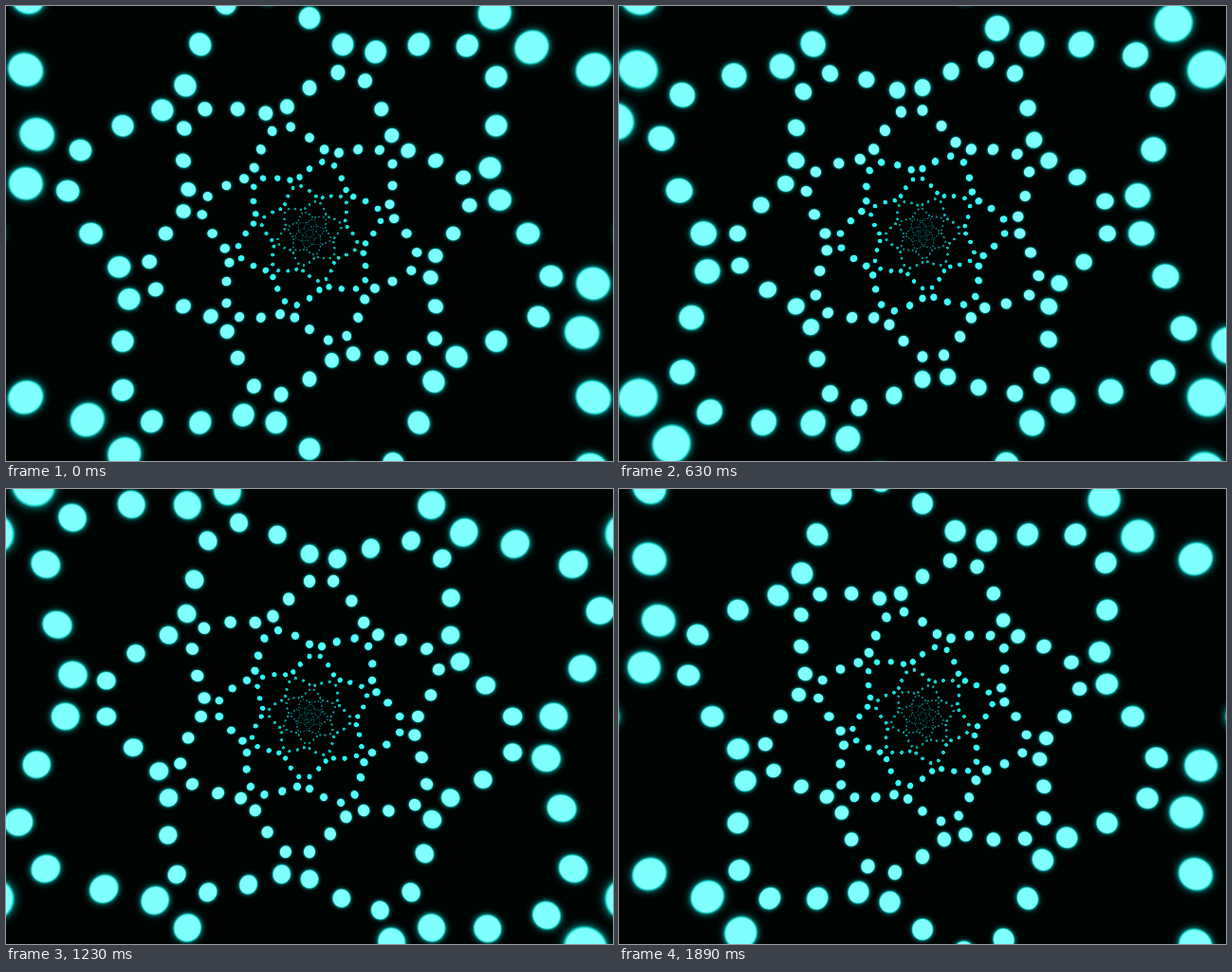
Animation, 640 px wide and 480 px high, one loop 1.92 s. Source, as an HTML page with a canvas:

```html
<!DOCTYPE html>
<html lang="en">
<head>
<meta charset="utf-8">
<title>Dot stars</title>
<style>
html, body { margin: 0; width: 100%; height: 100%; overflow: hidden; background: #000403; }
canvas { display: block; }
</style>
</head>
<body>
<canvas id="stage" width="640" height="480"></canvas>
<script>
const ctx = document.getElementById('stage').getContext('2d');
const FRAMES = 64, STEP = 30, SPOKES = 36, TAU = 2 * Math.PI;
const GROWTH = Math.log(1.5);  // log of the size ratio between neighbouring rings
const WAVE = 0.34;             // depth of the six-lobed wave, in rings
const ZOOM = 4 / FRAMES;       // rings travelled per frame
const GLOW = 1.6;              // reach of the halo, in dot radii

// Small dots are pure cyan, large ones have a pale core.
function dotPaint(radius) {
  const red = 127 * Math.min(1, Math.max(0, (radius - 30) / 80));
  const core = `rgb(${red}, 255, 250)`;
  const paint = ctx.createRadialGradient(0, 0, 0, 0, 0, GLOW);
  const stop = (at, color) => paint.addColorStop(at / GLOW, color);
  stop(0, core);
  stop(0.94, core);
  stop(1.02, 'rgba(20, 225, 216, .9)');
  stop(1.12, 'rgba(0, 140, 132, .5)');
  stop(1.3, 'rgba(0, 90, 85, .22)');
  stop(GLOW, 'rgba(0, 50, 48, 0)');
  return paint;
}

function dot(angle, r, size, speed) {
  const stretch = 0.12 * GROWTH * speed * r;  // blur along the direction of travel
  ctx.setTransform(1, 0, 0, 1, 320, 240);
  ctx.rotate(-angle);
  ctx.translate(r, 0);
  ctx.scale(size + stretch, size);
  ctx.fillRect(-GLOW, -GLOW, 2 * GLOW, 2 * GLOW);
}

function drawRing(ring, frame) {
  const level = 0.4 + ring + ZOOM * frame;
  const radius = Math.exp(GROWTH * level);
  if (radius < 3 || radius > 540) return;
  const size = Math.max(0.05 * radius - 0.5, 0.03 * radius + 0.3);
  const depth = ring % 2 ? -WAVE : WAVE;
  const turn = TAU * (frame + 0.5) / FRAMES;
  ctx.fillStyle = dotPaint(radius);
  ctx.globalAlpha = Math.min(1, 0.15 + radius / 65);
  for (let i = 0; i < SPOKES; i++) {
    const angle = TAU * i / SPOKES;
    const phase = 6 * angle - turn;
    const r = Math.exp(GROWTH * (level + depth * Math.sin(phase)));
    dot(angle, r, size, ZOOM - depth * TAU / FRAMES * Math.cos(phase));
  }
}

function draw() {
  const frame = Math.floor(performance.now() / STEP) % FRAMES;
  ctx.resetTransform();
  ctx.globalAlpha = 1;
  ctx.globalCompositeOperation = 'source-over';
  ctx.fillStyle = '#000403';
  ctx.fillRect(0, 0, 640, 480);
  ctx.globalCompositeOperation = 'lighter';
  for (let ring = -2; ring <= 16; ring++) drawRing(ring, frame);
  requestAnimationFrame(draw);
}
draw();
</script>
</body>
</html>
```
